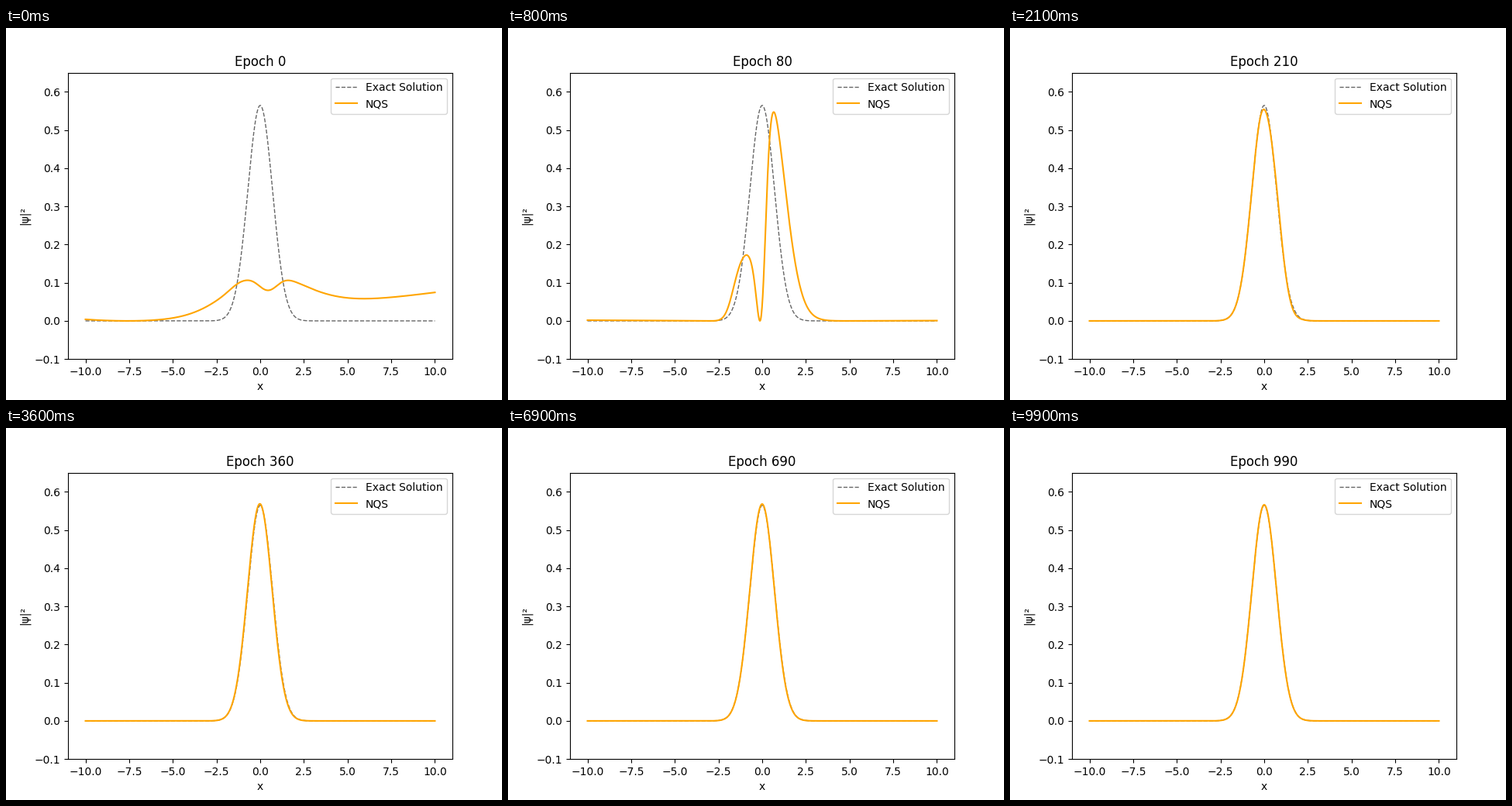
Write a matplotlib script that moves like this. It is 640x480 px and loops after 10000 ms.

```python
import numpy as np
import matplotlib.pyplot as plt
from matplotlib.animation import FuncAnimation

FRAMES, STEP_MS, EPOCHS_PER_FRAME = 100, 100, 10
x = np.linspace(-10, 10, 1000)


def bump(center, width):
    return np.exp(-((x - center) / width)**2)


def step(center, rate):
    return 1 / (1 + np.exp(-rate * (x - center)))


def ground(a=1.0, shift=0.0):
    """Ground state with stiffness a, displaced to the left by shift."""
    return (a / np.pi)**0.25 * np.exp(-a * (x + shift)**2 / 2)


def initial():
    """Untrained network: a bent ramp under a broad hump with a dip."""
    ramp = .167 + .0106 * x - .015 * np.log1p(np.exp(-(x + 1.7)))
    hump = .18 * bump(.05, 3.535) + .011 * bump(-1.3, .7)
    return -(ramp + hump - .065 * bump(.45, .75))


def split():
    """Two lobes of opposite sign around a node near the centre."""
    side = step(.01, 5)
    left = .465 * step(-1.87, 3)
    right = .98 * step(1.6, -1.45)
    return right * side - left * (1 - side) - .0035 * x + .008


def merged():
    """Almost converged: the ground state with a slight ripple."""
    return (ground() - .008 * bump(.1, .3) + .011 * bump(.85, .3)
            - .022 * bump(1.75, .4))


KEYS = [(0, initial()), (80, split()), (210, merged()),
        (360, ground(1.015, .02)), (490, ground(1.024, .007)),
        (690, ground(1.013, .004)), (990, ground(1.006))]


def norm(psi):
    return np.sqrt(np.sum(psi**2))


def density(epoch):
    """Blend neighbouring states, easing out and keeping the norm."""
    for (e0, p0), (e1, p1) in zip(KEYS, KEYS[1:]):
        if epoch <= e1:
            break
    w = 1 - ((e1 - epoch) / (e1 - e0))**2
    psi = (1 - w) * p0 + w * p1
    size = (1 - w) * norm(p0) + w * norm(p1)
    return (psi * size / norm(psi))**2


fig, ax = plt.subplots(figsize=(6.4, 4.8), dpi=100)
ax.plot(x, ground()**2, "k--", lw=1, alpha=0.6, label="Exact Solution")
line, = ax.plot(x, density(0), color="orange", label="NQS")
ax.set_ylim(-0.1, 0.65)
ax.set_xlabel("x")
ax.set_ylabel("|ψ|²")
ax.legend(loc="upper right")


def update(i):
    epoch = i * EPOCHS_PER_FRAME
    line.set_ydata(density(epoch))
    ax.set_title(f"Epoch {epoch}")
    return line,


anim = FuncAnimation(fig, update, frames=FRAMES, interval=STEP_MS,
                     repeat=True, repeat_delay=0, blit=False)
plt.show()
```
